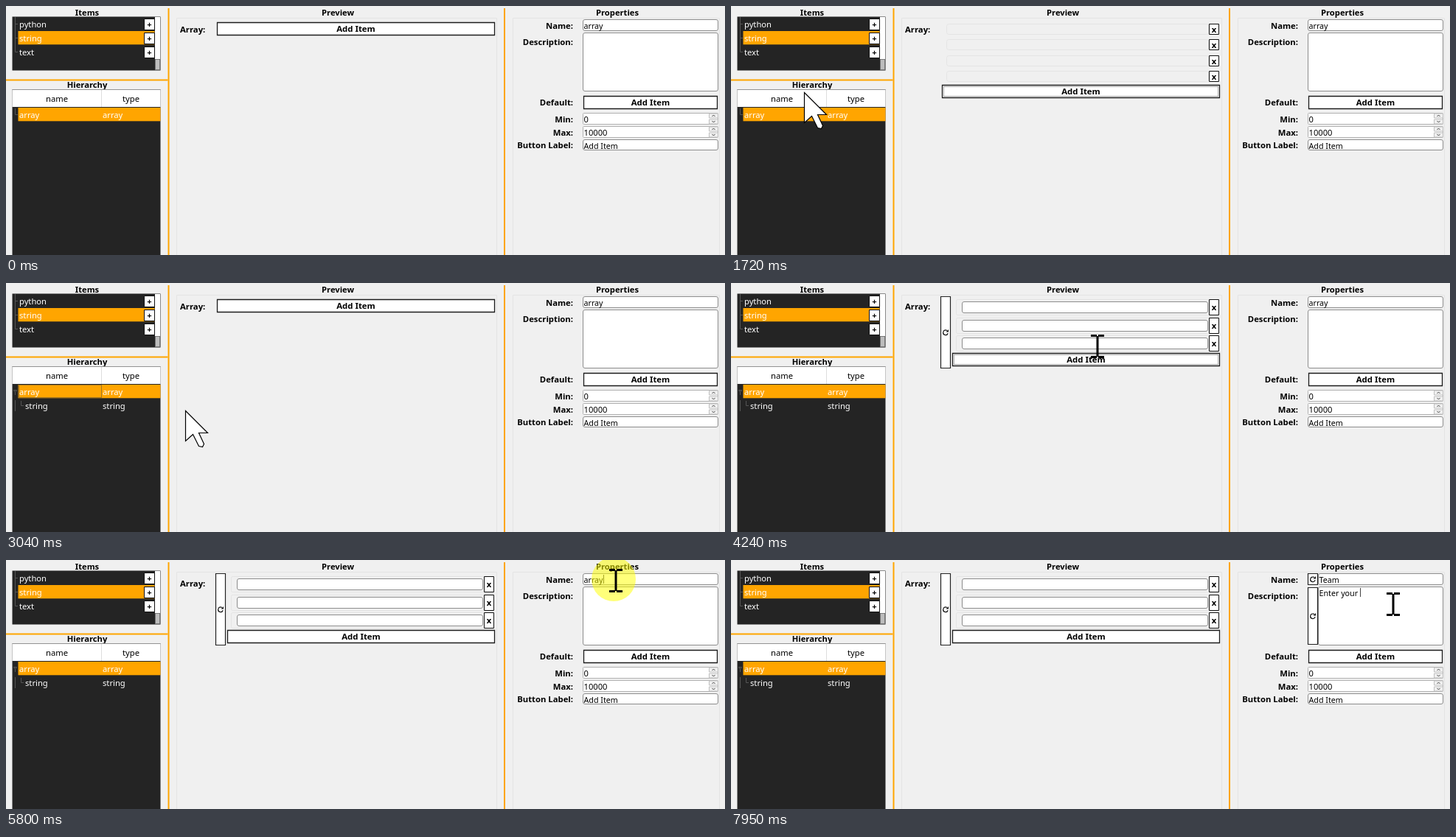
These frames come from a looping animation (975x338 px, 8000 ms). An HTML page with a canvas:

```html
<!DOCTYPE html>
<html lang="en">
<head>
<meta charset="utf-8">
<title>Form builder</title>
<style>
html, body { margin: 0; width: 100%; height: 100%; overflow: hidden; background: #f0f0f0; }
canvas { display: block; width: 975px; height: 338px; }
</style>
</head>
<body>
<canvas id="stage"></canvas>
<script>
const W = 975, H = 338, LOOP = 8000;
const ORANGE = '#ffa500', DARK = '#242424', BG = '#f0f0f0', FAINT = '#e4e4e4', BRANCH = '#555';
const DROP = 2480, NAME_CLICK = 5730, DESC_CLICK = 6740;
const canvas = document.getElementById('stage');
const dpr = window.devicePixelRatio || 1;
canvas.width = W * dpr;
canvas.height = H * dpr;
const ctx = canvas.getContext('2d');

// The pointer reaches each stop at t, rests there for hold ms, then eases to the next.
const stops = [], presses = [];
const go = (t, x, y, hold = 0) => stops.push({ t, x, y, leave: t + hold });
const press = (from, to) => presses.push({ from, to });
const click = (t, x, y) => { go(t, x, y, 100); press(t + 10, t + 90); };

const plainClick = i => 420 + 270 * i;
const fieldClick = i => 3520 + 210 * i;

go(30, 738, 235);
for (let i = 0; i < 4; i++) click(plainClick(i), 538, 32 + 21.25 * i);
go(1460, 440, 172);
go(1620, 202, 185, 100);
go(1720, 99, 117);
go(1900, 75, 44, 80);
press(1950, DROP);
go(2400, 89, 154, 130);
go(3040, 243, 173, 100);
go(3310, 380, 106, 100);
for (let i = 0; i < 3; i++) click(fieldClick(i), 494, 31 + 26.5 * i);
go(4240, 494, 84);
go(4980, 860, 160, 100);
click(NAME_CLICK, 824, 26);
go(6540, 824, 26);
click(DESC_CLICK, 895, 58);

const clamp = (v, lo, hi) => Math.max(lo, Math.min(hi, v));
const isPressed = t => presses.some(p => t >= p.from && t < p.to);
// how many steps have happened by t, the first one at start
const steps = (t, start, every, max) => clamp(Math.floor((t - start) / every) + 1, 0, max);

function pointerAt(t) {
  const i = stops.findIndex(s => s.t > t);
  if (i === 0) return null;
  if (i < 0) return stops[stops.length - 1];
  const a = stops[i - 1], b = stops[i];
  const u = clamp((t - a.leave) / (b.t - a.leave), 0, 1);
  const e = u * u * (3 - 2 * u);
  return { x: a.x + (b.x - a.x) * e, y: a.y + (b.y - a.y) * e };
}

const plainRows = t => steps(t, plainClick(0) + 90, 270, 4);
const fieldRows = t => steps(t, fieldClick(0) + 90, 210, 3);

function nameAt(t) {
  const k = steps(t, 5930, 58.75, 9);
  return k <= 5 ? 'array'.slice(0, 5 - k) : 'Team'.slice(0, k - 5);
}

function descAt(t) {
  const n = steps(t, 7180, 70, 3) + steps(t, 7420, 75, 8);
  return 'Enter your '.slice(0, n);
}

function fill(x, y, w, h, color) {
  ctx.fillStyle = color;
  ctx.fillRect(x, y, w, h);
}

function line(color, ...pts) {
  ctx.strokeStyle = color;
  ctx.lineWidth = 1;
  ctx.beginPath();
  pts.forEach(([x, y]) => ctx.lineTo(x, y));
  ctx.stroke();
}

function box(x, y, w, h, bg, border, width = 1, r = 0) {
  ctx.beginPath();
  ctx.roundRect(x + .5, y + .5, w - 1, h - 1, r);
  if (bg) { ctx.fillStyle = bg; ctx.fill(); }
  ctx.strokeStyle = border;
  ctx.lineWidth = width;
  ctx.stroke();
}

function dotted(x, y, w, h, color) {
  ctx.setLineDash([1, 1]);
  box(x, y, w, h, null, color);
  ctx.setLineDash([]);
}

// cy is the middle of the text line
function text(s, x, cy, { size = 11.2, bold = false, color = '#000', align = 'left' } = {}) {
  ctx.font = `${bold ? 'bold ' : ''}${size}px "Noto Sans", sans-serif`;
  ctx.textAlign = align;
  ctx.fillStyle = color;
  ctx.fillText(s, x, cy + 4);
}

const title = (s, x, cy) => text(s, x, cy, { bold: true, align: 'center' });
const label = (s, cy) => text(s, 769, cy, { bold: true, size: 11.3, align: 'right' });
const listText = (s, x, cy) => text(s, x, cy, { color: '#fff' });

function smallButton(s, x, y, w, h) {
  box(x, y, w, h, '#fff', '#111');
  text(s, x + w / 2, y + h / 2, { bold: true, size: 11.2, align: 'center' });
}

function addButton(x, cy, w, pressed, focused) {
  box(x, cy - 9, w, 18, pressed ? ORANGE : '#fff', '#1c1c1c', 1.3);
  if (pressed || focused) dotted(x + 2, cy - 7, w - 4, 14, '#666');
  text('Add Item', x + w / 2, cy, { bold: true, size: 11.4, color: pressed ? '#fff' : '#000', align: 'center' });
}

function resetButton(x, y, w, h) {
  box(x, y, w, h, '#fff', '#222', 1.2);
  const cx = x + w / 2, cy = y + h / 2;
  ctx.beginPath();
  ctx.arc(cx, cy + .3, 3.3, .3, 5.3);
  ctx.strokeStyle = ctx.fillStyle = '#111';
  ctx.stroke();
  ctx.beginPath();
  ctx.moveTo(cx + 4, cy - 4);
  ctx.lineTo(cx + 4, cy - .4);
  ctx.lineTo(cx + .5, cy - .4);
  ctx.fill();
}

function input(x, y, w, h, s = '', caret = false) {
  box(x, y, w, h, '#fff', '#8c8c8c', 1, 2.5);
  text(s, x + 1.5, y + 8.5, { size: 10.7 });
  if (caret) fill(Math.round(x + 2 + ctx.measureText(s).width), y + 2, 1, 12, '#444');
}

function spinner(y, value) {
  box(782, y, 184, 16, '#fff', '#b0b0b0', 1, 1);
  text(value, 783.5, y + 8.5);
  for (const dir of [-1, 1]) {
    const cy = y + 8 + dir * 4;
    box(953, cy - 3.5, 13, 7, BG, '#c0c0c0');
    line('#444', [957.5, cy - dir], [959.5, cy + dir], [961.5, cy - dir]);
  }
}

function drawItems() {
  title('Items', 110, 8.5);
  fill(8.5, 14.5, 201, 73, DARK);
  fill(16.5, 34, 185, 18.3, ORANGE);
  line(BRANCH, [12.5, 15], [12.5, 62.5]);
  ['python', 'string', 'text'].forEach((s, i) => {
    const y = 24.5 + i * 19;
    line(BRANCH, [12.5, y], [16, y]);
    listText(s, 18, y);
    smallButton('+', 187, Math.round(y - 8), 15, 16);
  });
  fill(202, 15, 7, 57, '#fff');
  box(202, 72, 7, 15, '#bdbdbd', '#777');
}

function drawHierarchy(hasChild, outlined) {
  title('Hierarchy', 110, 106.5);
  fill(8.5, 113, 201, H, DARK);
  fill(8.5, 113.5, 201, 23.5, '#fff');
  line('#ddd', [129.5, 114], [129.5, 137]);
  text('name', 69, 126, { align: 'center' });
  text('type', 169.5, 126, { align: 'center' });
  fill(16.5, 138, 193, 18.3, ORANGE);
  if (outlined) dotted(17, 138, 113, 18, '#444');
  listText('array', 18, 147.5);
  listText('array', 131, 147.5);
  if (!hasChild) {
    line(BRANCH, [12.5, 139], [12.5, 147.5], [16, 147.5]);
    return;
  }
  line(BRANCH, [12.5, 152], [12.5, 148.5], [10.5, 145.5], [14.5, 145.5], [12.5, 148.5]);
  line(BRANCH, [12.5, 159], [12.5, 174]);
  line(BRANCH, [20.5, 160], [20.5, 166.5], [24, 166.5]);
  listText('string', 26, 167);
  listText('string', 131, 167);
}

function drawPreview(t, dropped) {
  title('Preview', 450, 8.5);
  box(231, 16, 435, H, null, FAINT);
  text('Array:', 236, 31.5, { bold: true, size: 11.3 });
  const n = dropped ? fieldRows(t) : plainRows(t);
  const pressed = isPressed(t) && (t < 1400 || t > 3500 && t < 4100);
  const focused = n > 0 && t < NAME_CLICK;
  const addY = 31 + Math.round((dropped ? 24.4 : 21.25) * n);
  if (dropped && n) resetButton(284, 18, 14, addY - 6);
  for (let i = 0; i < n; i++) {
    if (dropped) {
      const cy = Math.round(33 + i * 24.5);
      box(305, cy - 11, 344, 22, null, FAINT, 1, 2);
      input(313, cy - 8, 334, 16);
      smallButton('x', 648, cy - 11, 14, 22);
    } else {
      const y = Math.round(24 + i * 21.25);
      box(292, y, 356, 15, null, FAINT, 1, 3);
      smallButton('x', 648, y, 14, 15);
    }
  }
  const x = dropped && n ? 300 : 286;
  addButton(x, addY, 663 - x, pressed, focused);
}

function drawProperties(t) {
  title('Properties', 829, 8.5);
  box(687, 16, 281, H, null, FAINT);
  label('Name:', 26.5);
  label('Description:', 49);
  label('Default:', 131);
  label('Min:', 153.5);
  label('Max:', 171.5);
  label('Button Label:', 189);

  const name = nameAt(t), desc = descAt(t);
  const renamed = t >= DESC_CLICK;
  const nameX = renamed ? 796 : 782, descX = desc ? 796 : 782;
  input(nameX, 18, 966 - nameX, 16, name, t >= NAME_CLICK && !renamed);
  input(descX, 36, 966 - descX, 80, desc, renamed);
  if (renamed) resetButton(782, 18, 14, 16);
  if (desc) resetButton(782, 37, 14, 78);

  addButton(783, 131, 182, false, false);
  spinner(145, '0');
  spinner(163, '10000');
  input(782, 181, 184, 15, 'Add Item');
}

function overText(x, y, t) {
  const row = Math.round((y - 33) / 24.5);
  if (x > 313 && x < 647)
    return row >= 0 && row < fieldRows(t) && Math.abs(y - 33 - row * 24.5) < 8;
  return x > 782 && x < 952 && (y > 18 && y < 116 || y > 145 && y < 196);
}

function drawBeam() {
  fill(1.5, -12, 3, 28, '#000');
  for (const y of [-14, 15]) {
    fill(-6, y, 8, 3, '#000');
    fill(4, y, 8, 3, '#000');
  }
}

function drawArrow() {
  const shape = [[0, 0], [0, 41], [10, 32], [18, 48], [23, 49], [25, 45], [18, 30], [30, 30]];
  ctx.beginPath();
  shape.forEach(([x, y]) => ctx.lineTo(x + .5, y + .5));
  ctx.closePath();
  ctx.fillStyle = '#fff';
  ctx.fill();
  ctx.strokeStyle = '#000';
  ctx.lineWidth = 1.2;
  ctx.stroke();
}

function drawPointer(t) {
  const p = pointerAt(t);
  if (!p) return;
  ctx.save();
  ctx.translate(Math.round(p.x), Math.round(p.y));
  if (isPressed(t)) {
    ctx.fillStyle = 'rgba(255,255,0,.52)';
    ctx.beginPath();
    ctx.arc(0, 0, 30, 0, 7);
    ctx.fill();
  }
  if (overText(p.x, p.y, t)) drawBeam();
  else drawArrow();
  ctx.restore();
}

function draw(t) {
  ctx.setTransform(dpr, 0, 0, dpr, 0, 0);
  fill(0, 0, W, H, BG);
  fill(219.5, 3, 2, H, ORANGE);
  fill(675, 3, 2, H, ORANGE);
  fill(0, 99.5, 219.5, 2, ORANGE);
  const dropped = t >= DROP;
  drawItems();
  drawHierarchy(dropped, dropped && t < fieldClick(0));
  drawPreview(t, dropped);
  drawProperties(t);
  drawPointer(t);
}

const start = performance.now();
function tick() {
  draw((performance.now() - start) % LOOP);
  requestAnimationFrame(tick);
}
draw(0);
requestAnimationFrame(tick);
</script>
</body>
</html>
```
